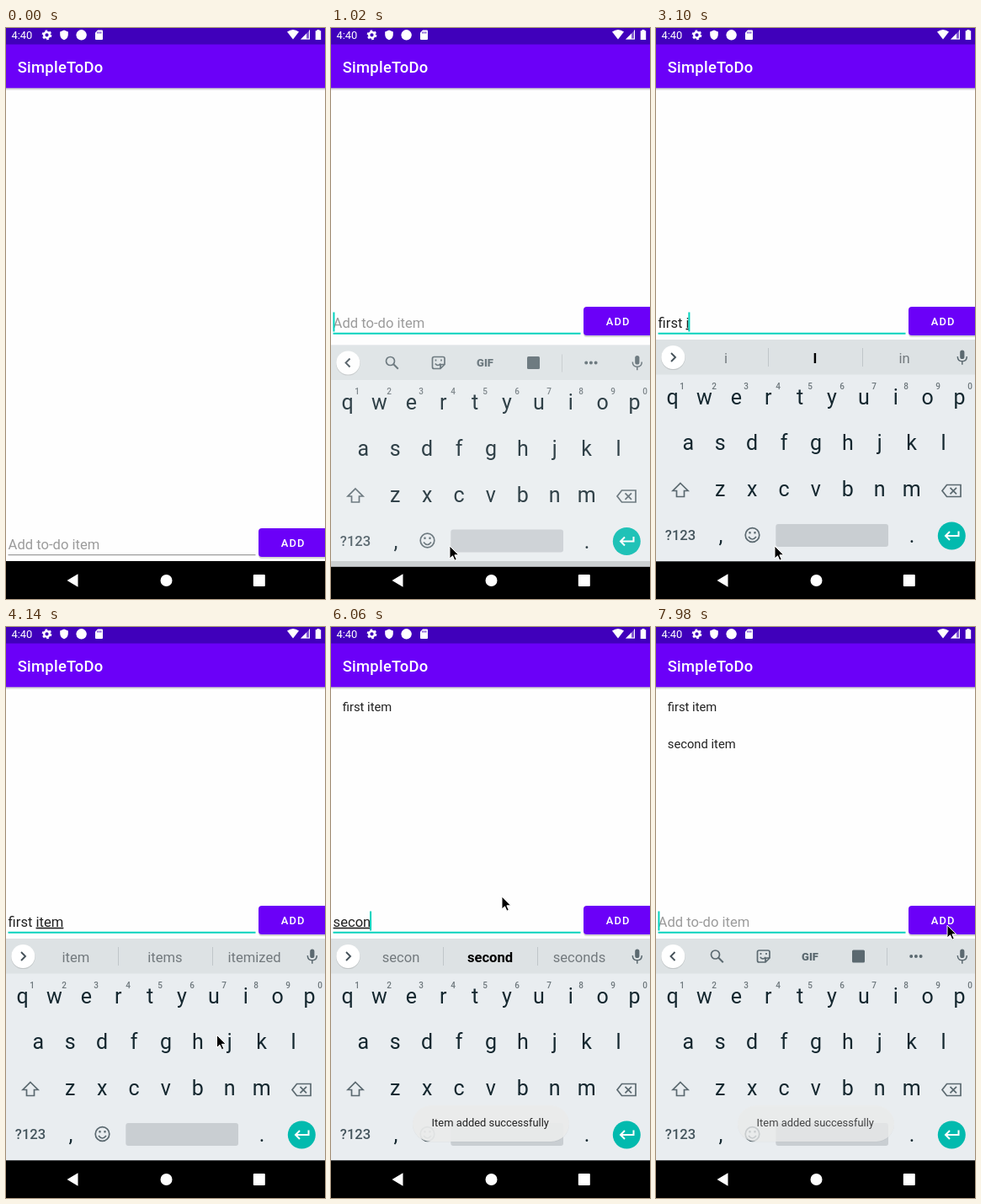
An HTML page that plays this animation: 379x678 px, repeating every 8 s.

```html
<!DOCTYPE html>
<html lang="en">
<head>
<meta charset="utf-8">
<title>To-do list</title>
<style>
  html, body { margin: 0; width: 100%; height: 100%; overflow: hidden; background: #fefefe; }
  svg { display: block; width: 379px; height: 678px; }
  text { font-family: Roboto, sans-serif; white-space: pre; }
  .mid { text-anchor: middle; }
  .med { font-weight: 500; }
  .line { fill: none; stroke: #5b6970; stroke-width: 1.7; }
  .entry { font-size: 16.6px; }
  .item { font-size: 14.75px; fill: #212121; }
  .key { font-size: 25px; fill: #14272f; }
  .digit { font-size: 10px; fill: #6d777c; font-weight: 500; }
  .hint { font-size: 16.6px; fill: #72797d; }
  .best { fill: #000; font-weight: 700; }
  .word { text-decoration: underline; text-decoration-thickness: 1px; }
</style>
</head>
<body>
<svg viewBox="0 0 379 678">
  <defs>
    <linearGradient id="shade" x2="0" y2="1">
      <stop stop-color="#000" stop-opacity=".25"/>
      <stop offset="1" stop-color="#000" stop-opacity="0"/>
    </linearGradient>
  </defs>
  <rect width="379" height="678" fill="#fefefe"/>
  <rect y="71" width="379" height="3.5" fill="url(#shade)"/>
  <rect y="19" width="379" height="52.3" fill="#6b00f8"/>
  <rect width="379" height="19.5" fill="#4000bb"/>
  <text class="med" x="13.7" y="52.6" font-size="18.4" letter-spacing=".28" fill="#fff">SimpleToDo</text>

  <g fill="#fff">
    <text x="6.5" y="13" font-size="12.9">4:40</text>
    <circle cx="48.5" cy="8.3" r="3.3" fill="none" stroke="#fff" stroke-width="2.4"/>
    <circle cx="48.5" cy="8.3" r="4.9" fill="none" stroke="#fff" stroke-width="2" stroke-dasharray="2.6 2.53"/>
    <path d="M69 2.5l4.8 2v3.6c0 3-2 5.300-4.800 6.100-2.800-.8-4.800-3.100-4.800-6.100V4.500z"/>
    <circle cx="89.600" cy="8.300" r="6.200"/>
    <path d="M109 2.500h5q1 0 1 1v9.500q0 1-1 1h-7q-1 0-1-1V5.500z"/>
    <path d="M108.800 4.500v2M110.800 4.500v2M112.800 4.500v2" stroke="#4000bb"/>
    <path d="M334 4.600q7-5 14 0l-7 9z"/>
    <path d="M361 2.500v11h-11z" fill-opacity=".35"/>
    <path d="M357 6.500v7h-7zM360 2.500h1v11h-11l1-1h9z"/>
    <path d="M369.500 2h3v1.300h1.700v10.700h-6.500V3.300h1.800z"/>
  </g>

  <text class="item" id="first" x="13.800" y="99.500">first item</text>
  <text class="item" id="second" x="13.800" y="144.400">second item</text>

  <g id="bar">
    <path id="under" d="M2.500 362.700H296.500"/>
    <text class="entry" id="entry" x="2.600" y="355.700"><tspan id="plain"></tspan><tspan id="word" class="word"></tspan></text>
    <rect id="caret" y="337.500" width="2" height="23" fill="#03d2bd"/>
    <rect x="300" y="333" width="84" height="34" rx="4" fill="#000" opacity=".16"/>
    <rect x="300" y="331" width="84" height="34" rx="4" fill="#6b00f8"/>
    <rect id="press" x="300" y="331" width="84" height="34" rx="4" fill="#fff" opacity=".14"/>
    <text class="med" x="326.700" y="353.300" font-size="12.900" letter-spacing="1.150" fill="#fff">ADD</text>
  </g>

  <rect y="633" width="379" height="45" fill="#000"/>
  <g fill="#fff">
    <path d="M72.500 656l13-7.800v15.600z"/>
    <circle cx="190.500" cy="656" r="7"/>
    <rect x="293.800" y="649" width="14" height="14" rx="1"/>
  </g>

  <g id="board">
    <rect y="370" width="379" height="263.300" fill="#e9edf0"/>
    <rect y="370" width="379" height="41.500" fill="#dde2e4"/>
    <circle cx="20.300" cy="391.800" r="14.300" fill="#000" opacity=".12"/>
    <circle cx="20.300" cy="391" r="14" fill="#fff"/>
    <path id="chevron" class="line" style="stroke:#45525a;stroke-width:1.900"/>
    <g id="tools">
      <circle class="line" cx="70.500" cy="389" r="5"/>
      <path class="line" style="stroke-width:2" d="M74.300 392.800l5.500 5.500"/>
      <path class="line" d="M122.500 384h10.500q2 0 2 2v7l-5 5h-7.500q-2 0-2-2v-10q0-2 2-2zM135 393h-3q-2 0-2 2v3M123.800 392q3.200 4 6.500 0M124.500 387v2M131 387v2"/>
      <text class="mid" x="183" y="395.600" font-size="13" font-weight="800" fill="#5b6970">GIF</text>
      <rect x="233" y="383.500" width="15" height="15" rx="1.500" fill="#5b6970"/>
      <path d="M274.500 381v21" stroke="#c3c9cc"/>
      <path d="M303.200 391h12" stroke="#5b6970" stroke-width="4" stroke-linecap="round" stroke-dasharray="0 5.700"/>
    </g>
    <g id="hints">
      <path d="M133.500 380v22M245.500 380v22" stroke="#c0c6c9"/>
    </g>
    <rect x="361.200" y="382.500" width="5.200" height="10.500" rx="2.600" fill="#5b6970"/>
    <path class="line" style="stroke-width:1.500" d="M358.300 390q0 5.700 5.500 5.700t5.500-5.700M363.800 395.700v4"/>
    <g id="keys"></g>
    <path class="line" d="M29 540.500l9 9h-4.500v7h-9v-7H20z"/>
    <path class="line" d="M345.500 542.500H362v14h-16.500l-5.500-7zM349.500 545.800l7.500 7.500M357 545.800l-7.500 7.500"/>
    <text class="mid med" x="29" y="608.300" font-size="16.600" fill="#46565e">?123</text>
    <circle class="line" cx="114.500" cy="602" r="8.300"/>
    <path class="line" d="M110 604q4.500 6 9 0"/>
    <path d="M111.500 598v2.500M117.500 598v2.500" stroke="#5b6970" stroke-width="2.200"/>
    <rect x="142.300" y="589" width="133.700" height="27" rx="3" fill="#c9ced2"/>
    <circle cx="351.300" cy="603" r="16.500" fill="#02baae"/>
    <path d="M359.500 597.500v5.500h-15M349 598l-5 5 5 5" fill="none" stroke="#fff" stroke-width="2"/>
  </g>

  <g id="toast">
    <rect x="97" y="569.500" width="186" height="42" rx="21" fill="#000" opacity=".05"/>
    <rect x="97" y="568" width="186" height="43" rx="21.500" fill="#ebecec" opacity=".93"/>
    <text x="119.600" y="593.400" font-size="12.900" fill="#222">Item added successfully</text>
  </g>

  <path id="mouse" d="M0 0v15l3.500-3.200 2.400 5.400 2.400-1-2.400-5.400h4.800z" fill="#000" stroke="#fff" stroke-width="1"/>
</svg>
<script>
const $ = id => document.getElementById(id);
const LOOP = 8000, STEP = 148, LEAD = 16;

function addText(parent, cls, x, y, str = '') {
  const el = document.createElementNS('http://www.w3.org/2000/svg', 'text');
  el.setAttribute('class', cls);
  el.setAttribute('x', x);
  el.setAttribute('y', y);
  el.textContent = str;
  return parent.appendChild(el);
}

const rows = [['qwertyuiop', 19.5, 446.5], ['asdfghjkl', 38.3, 501], ['zxcvbnm', 76.2, 556]];
for (const [letters, x, y] of rows)
  [...letters].forEach((c, i) => addText($('keys'), 'key mid', x + i * 37.9, y, c));
for (let i = 0; i < 10; i++) addText($('keys'), 'digit mid', 31 + i * 38, 428.5, (i + 1) % 10);
addText($('keys'), 'key mid', 77, 611, ',');
addText($('keys'), 'key mid', 304, 611, '.');
const hints = [83, 189, 295].map(x => addText($('hints'), 'hint mid', x, 397.6));

// step, finished text, word being composed, suggestions (* marks the best)
const typing = [
  [0, '', '', ''],
  [15, '', 'f', 'f for from'],
  [16, '', 'fi', 'fi find first'],
  [18, '', 'fir', 'fir first fire'],
  [19, '', 'firs', 'firs *first firstly'],
  [20, 'first ', '', 'time one of'],
  [21, 'first ', 'i', 'i *I in'],
  [22, 'first ', 'it', 'it item its'],
  [23, 'first ', 'ite', 'ite *item items'],
  [24, 'first ', 'item', 'item items itemized'],
  [32, '', '', ''],
  [38, '', 's', 's so see'],
  [39, '', 'se', 'se see send'],
  [40, '', 'seco', 'seco *second seconds'],
  [41, '', 'secon', 'secon *second seconds'],
  [42, '', 'second', 'second seconds secondary'],
  [43, 'second ', 'i', 'i *I in'],
  [44, 'second ', 'ite', 'ite *item items'],
  [45, 'second ', 'item', 'item items itemized'],
  [53, '', '', '']
];
const path = [[2, 196, 540], [4, 141, 615], [25, 141, 615], [31, 360, 354], [33, 360, 354],
  [35, 203, 320], [45, 203, 320], [49, 279, 345], [52, 346, 354]];
const caretOff = [[10, 13], [28, 31], [35, 38], [49, 52]];
const slide = { 6: [20, .4], 7: [6.5, .88] };
const toastFade = { 33: .55, 46: .4, 54: .82 };

const last = (list, n) => list.findLast(e => e[0] <= n);
const show = (id, on) => $(id).setAttribute('visibility', on ? 'visible' : 'hidden');
const move = (id, x, y) => $(id).setAttribute('transform', `translate(${x} ${y})`);

function mouseAt(n) {
  const a = last(path, n), b = path.find(p => p[0] > n) || a;
  const k = a === b ? 0 : (n - a[0]) / (b[0] - a[0]);
  return [1, 2].map(i => a[i] + (b[i] - a[i]) * k);
}

function drawEntry(n) {
  const [, done, word] = last(typing, n);
  const empty = !(done + word), focused = n >= 5;
  $('plain').textContent = empty ? 'Add to-do item' : done;
  $('word').textContent = word;
  $('entry').setAttribute('fill', empty ? '#9b9b9b' : '#212121');
  $('under').setAttribute('stroke', focused ? '#03d2bd' : '#858585');
  $('under').setAttribute('stroke-width', focused ? 2 : 1);
  $('caret').setAttribute('x', empty ? 2.4 : 1.4 + $('entry').getComputedTextLength());
  show('caret', focused && !caretOff.some(([a, b]) => n >= a && n < b));
  move('bar', 0, n < 6 ? 263 : 0);
}

function drawBoard(n) {
  const [y, alpha] = slide[n] || [0, 1];
  show('board', n >= 6);
  $('board').setAttribute('opacity', alpha);
  move('board', 0, y);

  // The suggestion strip closes one step after the field is cleared.
  const now = last(typing, n)[3];
  const list = now || last(typing, Math.max(0, n - 1))[3];
  $('tools').style.display = list ? 'none' : '';
  $('hints').style.display = list ? '' : 'none';
  $('chevron').setAttribute('d', list ? 'M18 386l5 5-5 5' : 'M22.500 386l-5 5 5 5');
  list.split(' ').forEach((s, i) => {
    hints[i].textContent = s.replace('*', '');
    hints[i].classList.toggle('best', s[0] === '*');
  });
}

function draw(n) {
  drawEntry(n);
  drawBoard(n);
  show('first', n >= 32);
  show('second', n >= 53);
  show('press', n === 32 || n === 53);
  $('toast').setAttribute('opacity', toastFade[n] ?? (n > 33 && n < 46 ? 1 : 0));
  show('mouse', n >= 2);
  if (n >= 2) move('mouse', ...mouseAt(n));
}

let shown = -1;
function tick() {
  const n = Math.floor((performance.now() % LOOP + LEAD) / STEP);
  if (n !== shown) draw(shown = n);
  requestAnimationFrame(tick);
}
tick();
</script>
</body>
</html>
```
